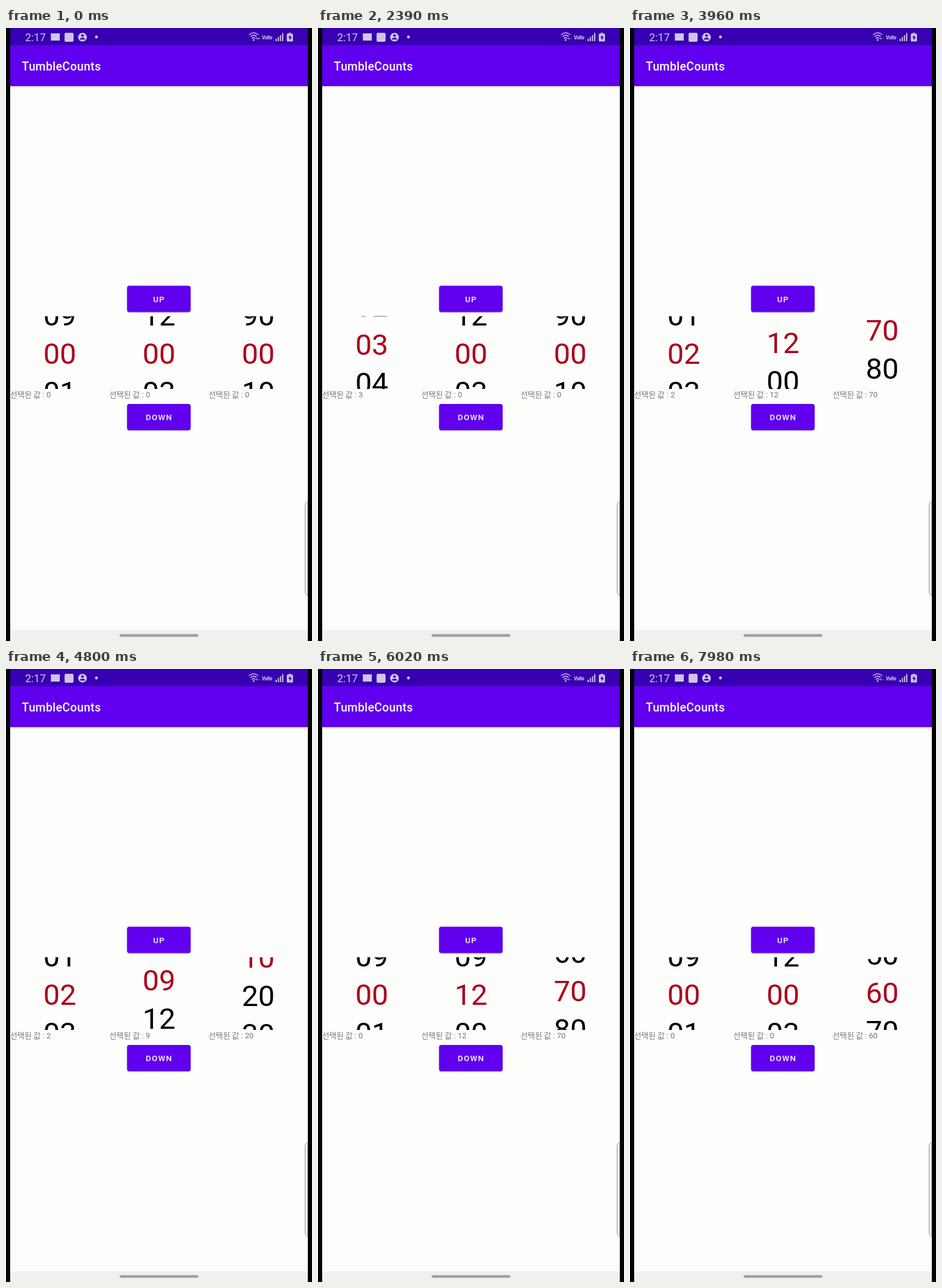
An HTML page for the animation above (8000 ms loop, 512 by 1024 pixels).

```html
<!DOCTYPE html>
<html lang="ko">
<head>
<meta charset="utf-8">
<title>TumbleCounts</title>
<style>
  html, body { margin: 0; width: 100%; height: 100%; overflow: hidden; background: #000; }
  svg { display: block; width: 100%; height: 100%; }
  text { font-family: Roboto, "Noto Sans CJK KR", "Noto Sans CJK", sans-serif; }
  .digits { font-size: 49px; text-anchor: middle; }
  .label { font-size: 13px; fill: #757575; }
  .button { font-size: 13.5px; font-weight: 500; letter-spacing: 1.3px; text-anchor: middle; fill: #fff; }
</style>
</head>
<body>
<svg id="stage" viewBox="0 0 512 1024">
  <defs>
    <clipPath id="window"><rect x="7" y="481.5" width="498" height="121.5"/></clipPath>
    <linearGradient id="shade" x2="0" y2="1">
      <stop stop-color="#b0b0b0" stop-opacity=".55"/>
      <stop offset="1" stop-color="#e0e0e0" stop-opacity="0"/>
    </linearGradient>
  </defs>
  <rect width="512" height="1024"/>
  <rect x="7" y="97" width="498" height="909" fill="#fdfdfc"/>
  <rect x="7" y="97" width="498" height="4" fill="url(#shade)"/>
  <rect x="7" y="28" width="498" height="69" fill="#6000ee"/>
  <rect x="7" width="498" height="28.5" fill="#3700b0"/>
  <text x="26.5" y="70.7" font-size="19.5" font-weight="500" letter-spacing=".4" fill="#fff">TumbleCounts</text>

  <g fill="#d0c4ea">
    <text x="32" y="21.7" font-size="18">2:17</text>
    <rect x="75" y="9" width="15" height="12"/>
    <rect x="98" y="8" width="15" height="15" rx="2.5"/>
    <circle cx="128" cy="15.3" r="7.3"/>
    <g fill="#3700b0"><circle cx="128" cy="12.6" r="2.2"/><path d="M123.7 19.2q0-3 4.3-3t4.3 3z"/></g>
    <circle cx="151.3" cy="15" r="2.4"/>
    <path d="M406.5 11.5q7.8-7 15.6 0M409 14.5q5.3-4.8 10.6 0M411.4 17.4q2.9-2.6 5.8 0"
      fill="none" stroke="#d0c4ea" stroke-width="1.5"/>
    <circle cx="414.4" cy="20" r="1.5"/>
    <path d="M418 18.5l1.7-2.5 1.7 2.5z"/>
    <path id="rx" d="M421.3 16.5h3.6l-1.8 3z"/>
    <text x="428" y="19" font-size="8.5" font-weight="700" font-style="italic" letter-spacing="-.4">Volte</text>
    <path d="M451 18h2v4h-2zM454.7 15h2v7h-2zM458.4 12h2v10h-2zM462 8.5h2v13.5h-2z"/>
    <path d="M473 8h4v1.5h2q1.2 0 1.2 1.2v10.6q0 1.2-1.2 1.2h-8q-1.2 0-1.2-1.2v-10.6q0-1.2 1.2-1.2h2z"/>
    <path d="M476 11l-3.8 5.5h2.5v4.2l3.6-5.7h-2.3z" fill="#3700b0"/>
  </g>

  <g id="buttons"></g>
  <g id="wheels" clip-path="url(#window)"></g>
  <g id="labels"></g>

  <path d="M505 791.5h-1.5q-3 1-3 6v144q0 5 3 6h1.5z" fill="#fdfdfc" stroke="#8c8c8c"/>
  <rect x="505" y="780" width="7" height="180"/>
  <rect x="7" y="1006" width="498" height="18" fill="#f0f0ee"/>
  <rect x="190" y="1012.5" width="132" height="4.5" rx="2.25" fill="#a0a0a0"/>
</svg>
<script>
const LOOP = 8000, REST = 561, GAP = 64;
const $ = id => document.getElementById(id);

function add(parent, tag, attrs, text = '') {
  const el = document.createElementNS('http://www.w3.org/2000/svg', tag);
  for (const k in attrs) el.setAttribute(k, attrs[k]);
  el.textContent = text;
  parent.appendChild(el);
  return el;
}

const ease = {
  drag: u => u * u * (1.4 - 0.4 * u),
  line: u => u,
  slow: u => 1 - (1 - u) ** 2
};

// Each key: time, wheel position in rows, easing towards it.
const wheels = [
  { x: 90, step: 1, count: 10, keys: [
    [1030, 0], [1590, -1.53, 'drag'], [3020, -8.016, 'slow'], [3200, -8, 'slow'],
    [4950, -8], [5950, -10, 'slow']] },
  { x: 256, step: 3, count: 5, keys: [
    [2620, 0], [3020, -2.664, 'drag'], [4350, -6, 'slow'],
    [4580, -6], [4800, -6.61, 'drag'], [5950, -11, 'slow'],
    [6120, -11], [7050, -14.984, 'slow'], [7120, -15, 'line']] },
  { x: 422, step: 10, count: 10, keys: [
    [3540, 0], [3800, -1.3, 'drag'], [4800, -8.03, 'line'], [6020, -12.906, 'slow'], [6160, -13, 'slow'],
    [6350, -13], [7050, -15.09, 'slow'], [7200, -15, 'slow'],
    [7400, -15], [7980, -13.96, 'slow']] }
];

function position(keys, t) {
  if (t <= keys[0][0]) return keys[0][1];
  for (let i = 1; i < keys.length; i++) {
    const [t0, p0] = keys[i - 1], [t1, p1, kind = 'line'] = keys[i];
    if (t <= t1) return p0 + (p1 - p0) * ease[kind]((t - t0) / (t1 - t0));
  }
  return keys[keys.length - 1][1];
}

for (const w of wheels) {
  w.rows = [0, 1, 2, 3].map(() => add($('wheels'), 'text', { class: 'digits', x: w.x }));
  w.label = add($('labels'), 'text', { class: 'label', x: w.x - 83, y: 616.5 });
}

for (const [name, y] of [['UP', 430.5], ['DOWN', 628]]) {
  const box = { x: 202.5, width: 106.5, height: 44, rx: 4 };
  add($('buttons'), 'rect', { ...box, y: y + 1.5, fill: '#d0d0d0' });
  add($('buttons'), 'rect', { ...box, y, fill: '#6000ee' });
  add($('buttons'), 'text', { class: 'button', x: 256.2, y: y + 27 }, name);
}

function drawWheel(w, t) {
  const p = position(w.keys, t);
  const speed = Math.abs(position(w.keys, t - 20) - p) * 50;
  const current = Math.floor(p + 0.1);
  const red = speed > 3 ? Math.floor(p) : current;
  const value = row => ((row % w.count + w.count) % w.count) * w.step;
  w.rows.forEach((el, i) => {
    const row = Math.floor(p) - 1 + i;
    el.textContent = String(value(row)).padStart(2, '0');
    el.setAttribute('y', REST + (row - p) * GAP);
    el.setAttribute('fill', row === red ? '#ac001c' : '#000');
  });
  w.label.textContent = '선택된 값 : ' + value(current);
}

function draw(t) {
  $('rx').setAttribute('opacity', t < 1850 ? 1 : 0.3);
  wheels.forEach(w => drawWheel(w, t));
}

const began = performance.now();
function tick() {
  draw((performance.now() - began) % LOOP);
  requestAnimationFrame(tick);
}
tick();
</script>
</body>
</html>
```
